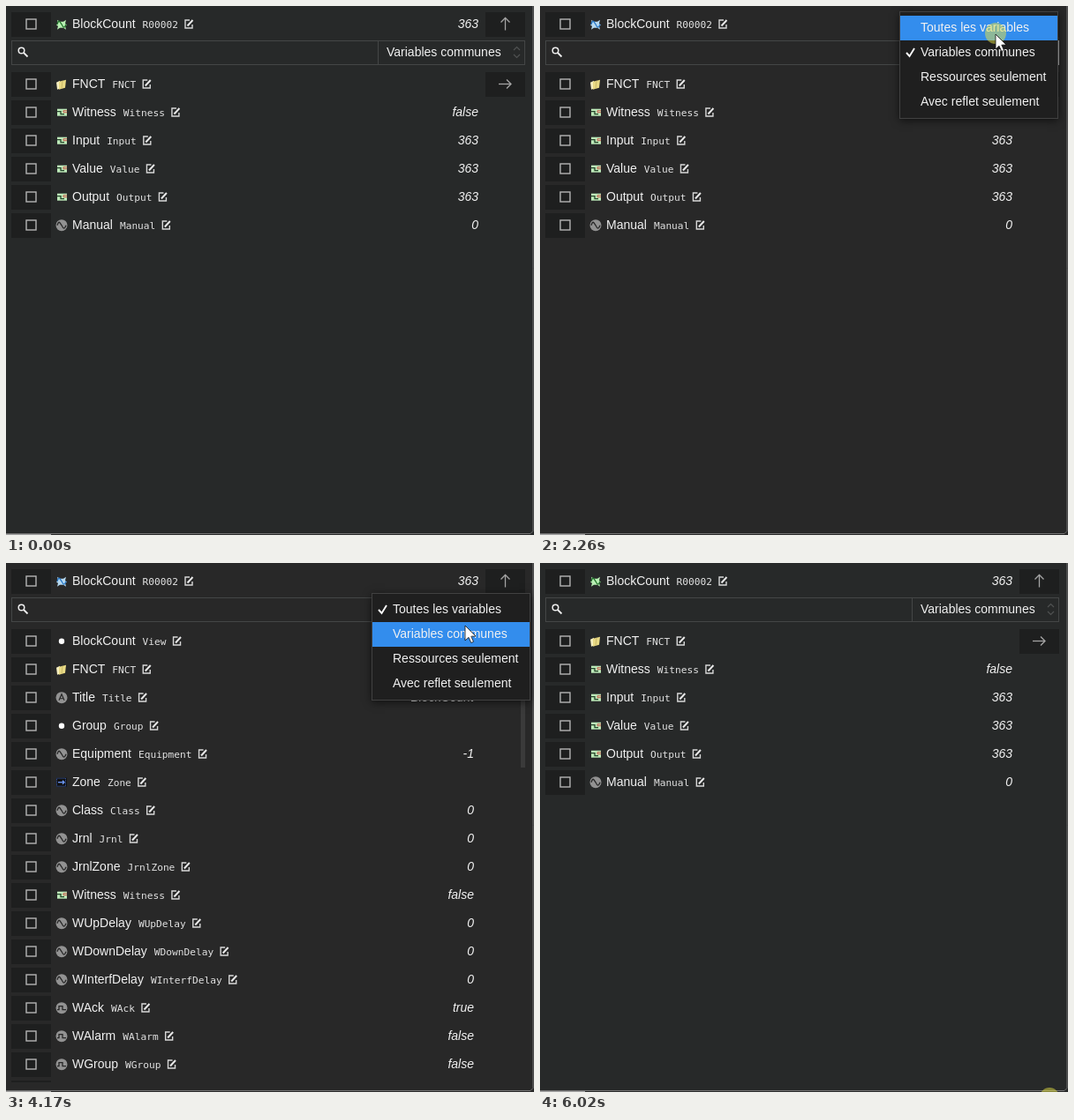
An HTML page with a canvas for the animation above (6080 ms loop, 598x600 px).

```html
<!DOCTYPE html>
<html lang="fr">
<head>
<meta charset="utf-8">
<title>Variables</title>
<style>
html, body { margin: 0; width: 100%; height: 100%; overflow: hidden; background: #272929; }
canvas { display: block; }
</style>
</head>
<body>
<canvas id="stage" width="598" height="600"></canvas>
<script>
const LOOP = 6080;
const ctx = document.getElementById('stage').getContext('2d', { alpha: false });
const SANS = '14px "Liberation Sans", Arial, sans-serif';
const MONO = '11.2px "DejaVu Sans Mono", monospace';

// name, identifier, icon, value
const COMMON = [
  ['FNCT', 'FNCT', 'folder', ''],
  ['Witness', 'Witness', 'port', 'false'],
  ['Input', 'Input', 'port', '363'],
  ['Value', 'Value', 'port', '363'],
  ['Output', 'Output', 'port', '363'],
  ['Manual', 'Manual', 'wave', '0']
];
const ALL = [
  ['BlockCount', 'View', 'dot', '25|10'],
  ['FNCT', 'FNCT', 'folder', ''],
  ['Title', 'Title', 'letter', 'BlockCount'],
  ['Group', 'Group', 'dot', ''],
  ['Equipment', 'Equipment', 'wave', '-1'],
  ['Zone', 'Zone', 'zone', ''],
  ['Class', 'Class', 'wave', '0'],
  ['Jrnl', 'Jrnl', 'wave', '0'],
  ['JrnlZone', 'JrnlZone', 'wave', '0'],
  ['Witness', 'Witness', 'port', 'false'],
  ['WUpDelay', 'WUpDelay', 'wave', '0'],
  ['WDownDelay', 'WDownDelay', 'wave', '0'],
  ['WInterfDelay', 'WInterfDelay', 'wave', '0'],
  ['WAck', 'WAck', 'pulse', 'true'],
  ['WAlarm', 'WAlarm', 'pulse', 'false'],
  ['WGroup', 'WGroup', 'pulse', 'false'],
  ['', '', '', '']
];
const OPTIONS = ['Toutes les variables', 'Variables communes', 'Ressources seulement', 'Avec reflet seulement'];

// Pointer moves: start, end, from, to
const MOVES = [
  [500, 1050, [577, 604], [518, 38]],
  [1180, 1300, [518, 38], [519, 46]],
  [1740, 2120, [519, 46], [516, 32]],
  [2780, 3000, [516, 32], [520, 47]],
  [3720, 4140, [520, 47], [520, 71]],
  [5230, 5480, [520, 71], [557, 604]]
];
const CLICKS = [[1270, 1410], [2260, 2400], [3410, 3550], [4310, 4530]];

const clamp = x => Math.max(0, Math.min(1, x));
const ramp = (t, a, b) => clamp((t - a) / (b - a));
const ease = x => x * x * (3 - 2 * x);

function rect(x, y, w, h, color) {
  ctx.fillStyle = color;
  ctx.fillRect(x, y, w, h);
}

function frame(x, y, w, h, color, width = 1) {
  ctx.strokeStyle = color;
  ctx.lineWidth = width;
  ctx.strokeRect(x, y, w, h);
}

function line(points, color, width = 1) {
  ctx.beginPath();
  for (let i = 0; i < points.length; i += 2) ctx.lineTo(points[i], points[i + 1]);
  ctx.strokeStyle = color;
  ctx.lineWidth = width;
  ctx.stroke();
}

function disc(x, y, r, color) {
  ctx.beginPath();
  ctx.arc(x, y, r, 0, 2 * Math.PI);
  ctx.fillStyle = color;
  ctx.fill();
}

function shape(points, color) {
  ctx.beginPath();
  for (let i = 0; i < points.length; i += 2) ctx.lineTo(points[i], points[i + 1]);
  ctx.closePath();
  ctx.fillStyle = color;
  ctx.fill();
}

function text(s, x, y, { font = SANS, color = '#f1f1f1', align = 'left' } = {}) {
  ctx.font = font;
  ctx.fillStyle = color;
  ctx.textAlign = align;
  ctx.fillText(s, x, y);
  return ctx.measureText(s).width;
}

function sine(color) {
  ctx.beginPath();
  ctx.moveTo(-5, 0);
  ctx.bezierCurveTo(-3, -6, -2, -3, 0, 0);
  ctx.bezierCurveTo(2, 4, 3, 5, 5, 0);
  ctx.strokeStyle = color;
  ctx.lineWidth = 1.3;
  ctx.stroke();
}

// Icons are drawn around their own centre.
const ICONS = {
  block(blue) {
    shape([-5, -5, -2, -3, 2, -3, 5, -5, 4, -1, 6, 1, 4, 2, 5, 6, 2, 4, -2, 4, -5, 6, -4, 2, -6, 1, -4, -1],
      blue ? '#b5d8f0' : '#b9efb4');
    sine(blue ? '#2878c8' : '#23752d');
  },
  folder() {
    shape([-6, -2, -2, -4, -2, 5, -5, 6], '#f7efc0');
    shape([-3, -3, 5, -5, 4, 4, -3, 6], '#e9da85');
    line([1, -4, 0, 5], '#bba95c', .7);
  },
  port() {
    rect(-5, -4, 11, 8, '#bdeab9');
    line([-5, -1, -1, -1, -1, 2, 3, 2], '#26462a', 1.3);
    line([6, -2, 2, -2, 2, 0, 6, 0], '#c85a4d');
  },
  wave() {
    disc(0, 0, 6.5, '#929292');
    sine('#272727');
  },
  pulse() {
    disc(0, 0, 6.5, '#929292');
    line([-5, 2, -3, 2, -3, -2, 1, -2, 1, 2, 5, 2], '#272727', 1.3);
  },
  letter() {
    disc(0, 0, 6.5, '#929292');
    line([-3, 3, 0, -4, 3, 3], '#272727', 1.2);
    line([-2, 1, 2, 1], '#272727');
  },
  dot() { disc(0, 0, 3.2, '#fff'); },
  zone(blue) {
    rect(-6, -5, 12, 10, '#101010');
    ctx.setLineDash([1, 1]);
    frame(-5.5, -4.5, 10, 9, blue ? '#3a62c0' : '#666');
    ctx.setLineDash([]);
    line([-4, 0, 3, 0], blue ? '#6f9cff' : '#ddd', 1.3);
    line([1, -2, 3, 0, 1, 2], blue ? '#6f9cff' : '#ddd', 1.3);
  }
};

function editIcon(x, y) {
  line([x + 6, y - 4, x + 1, y - 4, x + 1, y + 5, x + 9, y + 5, x + 9, y + 1], '#d8d8d8', 1.4);
  line([x + 3.5, y + 2.5, x + 9.5, y - 4], '#e8e8e8', 2);
}

function arrow(x, y, angle) {
  ctx.save();
  ctx.translate(x, y);
  ctx.rotate(angle);
  line([-7, 0, 7, 0], '#a4a4a4', 1.3);
  line([2, -5, 7, 0, 2, 5], '#a4a4a4', 1.3);
  ctx.restore();
}

function row([name, id, icon, value], y, right, blue) {
  rect(6, y - 13, 45, 28, '#1e1f1f');
  frame(23, y - 5, 11, 11, '#b4b4b4', 1.4);
  if (!name) return;
  ctx.save();
  ctx.translate(63, y + .7);
  ICONS[icon](blue);
  ctx.restore();
  let x = 75 + text(name, 75, y + 5) + 8;
  x += text(id, x, y + 5, { font: MONO, color: '#e2e2e2' });
  editIcon(x + 7, y);
  text(value, right, y + 5, { font: 'italic ' + SANS, align: 'right' });
  if (icon === 'folder') {
    rect(right + 8, y - 13, 45, 28, '#1e1f1f');
    arrow(right + 30, y + .5, 0);
  }
}

function toolbar(all, active) {
  const x = all ? 428.5 : 421.5;
  frame(6.5, 39.5, x - 6.5, 27, '#444646');
  frame(x, 39.5, 587.5 - x, 27, active ? '#b4b4b4' : '#444646');
  ctx.beginPath();
  ctx.arc(17.5, 50.5, 3.3, 0, 2 * Math.PI);
  ctx.strokeStyle = '#eee';
  ctx.lineWidth = 1.5;
  ctx.stroke();
  line([20, 53, 24.5, 57.5], '#eee', 1.8);
  text(OPTIONS[all ? 0 : 1], x + 9.5, 57);
  const color = active ? '#c4c4c4' : '#505252';
  line([575, 50, 578.5, 46.5, 582, 50], color, 1.2);
  line([575, 55, 578.5, 58.5, 582, 55], color, 1.2);
}

function menu(x, y, alpha, checked, hover) {
  ctx.save();
  ctx.globalAlpha = alpha;
  ctx.shadowColor = 'rgba(0,0,0,.6)';
  ctx.shadowBlur = 9;
  ctx.shadowOffsetY = 2;
  rect(x, y, 180, 122, '#1f1f1f');
  ctx.shadowColor = 'transparent';
  frame(x + .5, y + .5, 179, 121, '#414141');
  OPTIONS.forEach((label, i) => {
    const top = y + 5 + 28 * i;
    if (i === hover) rect(x + 1, top, 178, 28, '#338ded');
    if (i === checked) line([x + 8, top + 14, x + 11.5, top + 18, x + 17, top + 9], '#fff', 1.9);
    text(label, x + 24, top + 18);
  });
  ctx.restore();
}

function pointerAt(t) {
  if (t < 540 || t >= 5480) return null;
  const [a, b, from, to] = MOVES.filter(m => t >= m[0]).pop();
  const k = ease(ramp(t, a, b));
  return from.map((v, i) => v + (to[i] - v) * k);
}

function pointer(x, y) {
  ctx.save();
  ctx.translate(x, y);
  shape([0, 0, 0, 17, 4, 13.3, 6.8, 19.5, 9.5, 18.3, 6.8, 12.2, 12, 12], '#fff');
  ctx.strokeStyle = '#111';
  ctx.lineWidth = .8;
  ctx.stroke();
  ctx.restore();
}

function draw(t) {
  const all = t >= 2470 && t < 4600;
  const firstMenu = t < 3200;
  const alpha = firstMenu
    ? ramp(t, 1380, 1540) * (1 - ramp(t, 2580, 2840))
    : ramp(t, 3530, 3690) * (1 - ramp(t, 4530, 4750));
  const blue = t >= 1410 && t < 2470 || t >= 3600 && t < 4600;
  const right = all ? 530 : 535;

  rect(0, 0, 598, 600, t >= 1410 && t < 4700 ? '#282828' : '#272929');
  row(['BlockCount', 'R00002', 'block', '363'], 20, 535, blue);
  rect(543, 7, 45, 28, '#1e1f1f');
  arrow(565.5, 20.5, -Math.PI / 2);
  toolbar(all, alpha > 0);

  ctx.save();
  ctx.beginPath();
  ctx.rect(0, 71, 598, 518);
  ctx.clip();
  (all ? ALL : COMMON).forEach((item, i) => row(item, 88 + 32 * i, right, blue));
  if (all) rect(583, 71, 5, 161, '#3a3a3a');
  ctx.restore();

  // Window edge
  line([0, 598.5, 594, 598.5, 597, 595.5, 597, 0], '#747474');
  rect(0, 599, 51, 1, '#a0a0a0');

  const pos = pointerAt(t);
  if (alpha > 0) {
    const [x, y] = firstMenu ? [407, 6] : [414, 34];
    const closing = firstMenu ? t >= 2470 : t >= 4600;
    const hover = closing ? -1 : Math.floor((pos[1] - y - 5) / 28);
    menu(x, y, alpha, all ? 0 : 1, hover);
  }

  const glow = 'rgba(232,228,70,.5)';
  if (pos) {
    if (CLICKS.some(([a, b]) => t >= a && t < b)) disc(pos[0], pos[1] - 1, 12, glow);
    pointer(...pos);
  }
  if (t >= 6020) disc(577, 606, 11, glow);
}

function tick() {
  draw(performance.now() % LOOP);
  requestAnimationFrame(tick);
}
tick();
</script>
</body>
</html>
```
